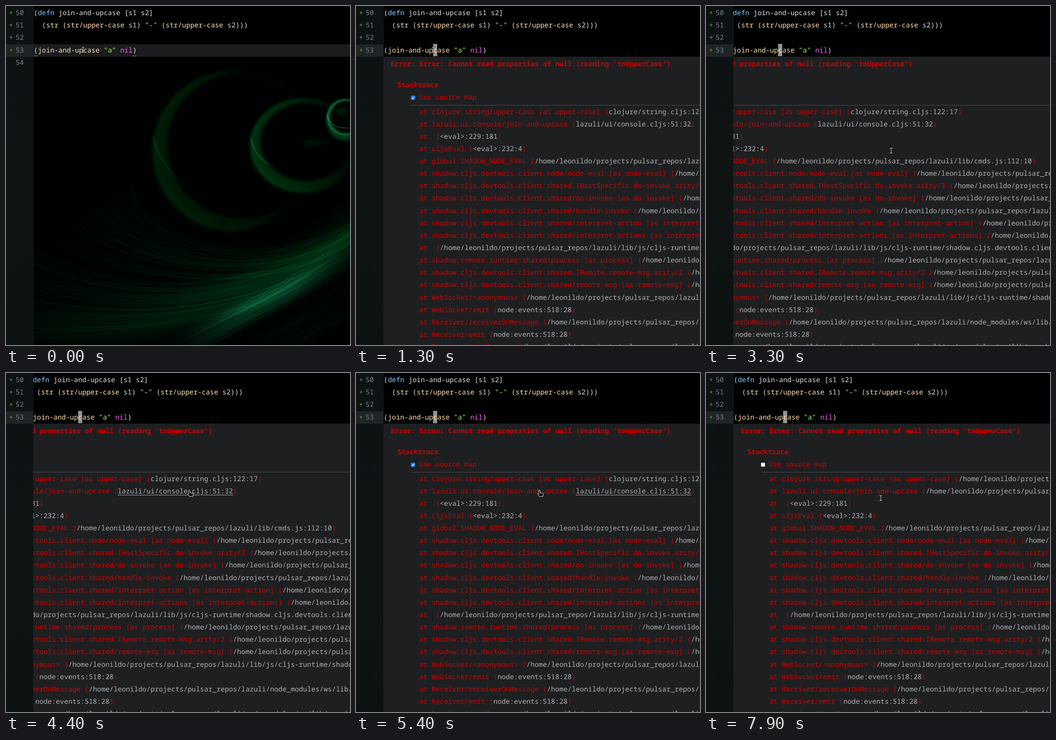
Recreate the animation shown at these times as an HTML page with a canvas. Size 754 by 743 pixels, loop 8 s.

```html
<!DOCTYPE html>
<html lang="en">
<head>
<meta charset="utf-8">
<title>Stack trace in the editor</title>
<style>
html, body { margin: 0; width: 100%; height: 100%; overflow: hidden; background: #000; }
#stage {
  position: relative; width: 754px; height: 743px; overflow: hidden; background: #000;
  font: 500 15.05px/27.14px "Noto Sans Mono", "DejaVu Sans Mono", monospace;
  font-variant-ligatures: none; text-rendering: geometricPrecision; white-space: pre;
}
#stage * { animation-duration: 8s; animation-timing-function: step-end; animation-iteration-count: infinite; }
#stage div, #art, svg { position: absolute; }

#gutter { inset: 0 auto 0 0; width: 60.5px; background: linear-gradient(#0c1113, #0f1314 45%, #0d1312 85%, #0c1211); color: #798084; }
#gutter div { left: 0; width: 60px; height: 27.14px; padding-left: 21px; box-sizing: border-box; }
#gutter .add::before { content: "+"; position: absolute; left: 6.5px; color: #64a336; }
#gutter .now { background: #1f2426; }
.last { top: 110.7px; animation-name: last; }
@keyframes last { 0% { top: 110.7px } 15% { top: 134.5px } 16.25%, 100% { top: 760px } }

#view { left: 60px; top: 0; right: 0; bottom: 0; overflow: hidden; }
#line { left: 0; right: 0; top: 83.5px; height: 27px; background: #1b1c1e; }
#pair i { position: absolute; top: 108.5px; width: 9px; height: 1px; background: #8a8f92; }
#line, #pair { animation-name: first; }
@keyframes first { 0% { opacity: 1 } 1.25%, 100% { opacity: 0 } }
#code { left: .8px; top: 2.1px; color: #dcdfdf; animation-name: code; }
@keyframes code { 0% { transform: none } 41.25% { transform: translateX(-11px) } 65%, 100% { transform: none } }
#caret { left: 108.3px; top: 81.4px; width: 9px; height: 27px; background: #929292; animation-name: caret; }
@keyframes caret { 0% { opacity: 0 } 1.25%, 100% { opacity: 1 } }
#text { left: 0; top: 0; }
.k { color: #82c8ff } .f { color: #ffdcae } .s { color: #a5f24e } .n { color: #f562ee }

#panel { left: 0; top: 110.7px; width: 694px; overflow: hidden; background: #1e1f21; animation-name: panel; }
@keyframes panel { 0% { height: 0 } 15% { height: 24px } 16.25%, 100% { height: 640px } }
#gear { left: 353px; top: 5px; animation-name: gear; }
@keyframes gear { 0% { opacity: 0 } 15% { opacity: 1 } 16.25%, 100% { opacity: 0 } }
#trace { left: -60px; top: -110.7px; width: 2200px; height: 760px; color: #d00000; animation-name: trace; }
@keyframes trace {
  0% { opacity: 0; transform: none } 16.25% { opacity: 1; transform: none }
  41.25% { opacity: 1; transform: translateX(-237px) } 65% { opacity: 1; transform: translateX(-226px) }
  66.25% { opacity: 1; transform: translateX(-96px) } 67.5%, 100% { opacity: 1; transform: none }
}
#trace b { position: absolute; }
#rule { left: 121px; top: 216.5px; width: 2000px; height: 1px; background: #484a4c; }
#stack { left: 138.7px; top: 218.5px; }
.path { color: #b0b0b0; text-decoration: underline transparent 1px; text-underline-offset: 3px; }
.l0 { animation-name: l0; }
@keyframes l0 { 0% { text-decoration-color: transparent } 52.5% { text-decoration-color: #b0b0b0 } 55%, 100% { text-decoration-color: transparent } }
.l1 { animation-name: l1; }
@keyframes l1 {
  0% { text-decoration-color: transparent } 51.25% { text-decoration-color: #b0b0b0 }
  52.5% { text-decoration-color: transparent } 55% { text-decoration-color: #b0b0b0 }
  72.5%, 100% { text-decoration-color: transparent }
}
.raw { position: absolute; animation-name: raw; }
@keyframes raw { 0% { opacity: 0 } 93.75%, 100% { opacity: 1 } }
.mapped, #tick { animation-name: mapped; }
@keyframes mapped { 0% { opacity: 1 } 93.75%, 100% { opacity: 0 } }
#box { left: 120px; top: 196px; animation-name: box; }
@keyframes box { 0% { color: #0c7bff } 87.5% { color: #0a66d6 } 97.5%, 100% { color: #0c7bff } }

#mouse { left: 0; top: 0; animation-name: mouse; }
#mouse svg { left: -20px; top: -20px; }
@keyframes mouse {
  0% { transform: translate(169px, 96px) }
  25% { transform: translate(225px, 150px) }
  26.25% { transform: translate(345px, 274px) }
  27.5% { transform: translate(395px, 317px) }
  41.25% { transform: translate(406px, 317px) }
  45% { transform: translate(406px, 305px) }
  46.25% { transform: translate(405px, 290px) }
  47.5% { transform: translate(405px, 281px) }
  51.25% { transform: translate(404px, 257px) }
  52.5% { transform: translate(404px, 223px) }
  53.75% { transform: translate(403px, 232px) }
  55% { transform: translate(402px, 257px) }
  72.5% { transform: translate(401px, 259px) }
  76.25% { transform: translate(365px, 232px) }
  77.5% { transform: translate(266px, 165px) }
  78.75% { transform: translate(189px, 130px) }
  80% { transform: translate(162px, 104px) }
  81.25% { transform: translate(152px, 97px) }
  82.5% { transform: translate(147px, 112px) }
  83.75% { transform: translate(143px, 150px) }
  85% { transform: translate(139px, 190px) }
  86.25% { transform: translate(136px, 206px) }
  87.5% { transform: translate(121px, 200px) }
  90% { transform: translate(121px, 199px) }
  97.5% { transform: translate(270px, 245px) }
  98.75%, 100% { transform: translate(383px, 274px) }
}
#beam { animation-name: beam; }
@keyframes beam { 0% { opacity: 1 } 51.25% { opacity: 0 } 72.5% { opacity: 1 } 85% { opacity: 0 } 97.5%, 100% { opacity: 1 } }
#hand { animation-name: hand; }
@keyframes hand { 0% { opacity: 0 } 51.25% { opacity: 1 } 72.5%, 100% { opacity: 0 } }
#arrow { animation-name: arrow; }
@keyframes arrow { 0% { opacity: 0 } 85% { opacity: 1 } 97.5%, 100% { opacity: 0 } }
</style>
</head>
<body>
<div id="stage"><canvas id="art" width="754" height="743"></canvas><div id="gutter"><div class="add" style="top:2.1px">50</div><div class="add" style="top:29.2px">51</div><div class="add" style="top:56.4px">52</div><div class="add now" style="top:83.5px">53</div><div class="last">54</div></div><div id="view"><div id="line"></div><div id="pair"><i style="left:.5px"></i><i style="left:217px"></i></div><div id="code"><div id="caret"></div><div id="text">(<span class="k">defn</span> join-and-upcase [s1 s2]
  (<span class="f">str</span> (<span class="f">str/upper-case</span> s1) <span class="s">"-"</span> (<span class="f">str/upper-case</span> s2)))

(<span class="f">join-and-upcase</span> <span class="s">"a"</span> <span class="n">nil</span>)</div></div><div id="panel"><svg id="gear" width="14" height="14" fill="none" stroke="#a2a2a2"><circle cx="7" cy="7" r="4" stroke-width="2"/><circle cx="7" cy="7" r="5.6" stroke-width="1.8" stroke-dasharray="2.2 2.2"/></svg><div id="trace"><b style="left:75.8px;top:114.4px">Error: Error: Cannot read properties of null (reading 'toUpperCase')</b><b style="left:90.8px;top:159.5px">Stacktrace</b><svg id="box" width="10" height="10"><rect x=".8" y=".8" width="8.4" height="8.4" rx="1" fill="#fff"/><g id="tick"><rect x=".5" y=".5" width="9" height="9" rx="1.5" fill="currentColor"/><path d="M2.4 5.2l1.9 1.9 3.4-4.2" fill="none" stroke="#fff" stroke-width="1.4"/></g></svg><div style="left:138px;top:186.5px">Use source map</div><div id="rule"></div><div id="stack"></div></div></div></div><div id="mouse"><svg id="beam" width="40" height="40" fill="none"><g transform="translate(20 20)"><path d="M-3-5.5H-1Q0-5.5 0-4.5V4.5Q0 5.5-1 5.5H-3M3-5.5H1Q0-5.5 0-4.5V4.5Q0 5.5 1 5.5H3" stroke="#111" stroke-width="2.6"/><path d="M-3-5.5H-1Q0-5.5 0-4.5V4.5Q0 5.5-1 5.5H-3M3-5.5H1Q0-5.5 0-4.5V4.5Q0 5.5 1 5.5H3" stroke="#ddd" stroke-width="1.1"/></g></svg><svg id="hand" width="40" height="40"><path transform="translate(20 20)" d="M-1.6.8a1.5 1.5 0 0 1 3 0V5.4L7 6.6Q8.8 7 8.5 9L7.6 13.6H0L-3.6 8.6Q-3.6 7-1.6 7.8Z" fill="#111" stroke="#eee"/></svg><svg id="arrow" width="40" height="40"><path transform="translate(20 20)" d="M0 0V12.5L3 9.8 5 14 7 13 5.2 9H9Z" fill="#111" stroke="#eee"/></svg></div></div>
<script>
const home = '/home/leonildo/projects/pulsar_repos/';
const lib = home + 'lazuli/lib/';
const rt = lib + 'js/cljs-runtime/';
const dev = 'shadow.cljs.devtools.client.';
const shared = dev + 'shared';
const sharedJs = rt + shared + '.js:';
const calls = [
  ['clojure.string/upper-case [as upper-case]', 'clojure/string.cljs:122:17', rt + 'clojure.string.js:204:10'],
  ['lazuli.ui.console/join-and-upcase', 'lazuli/ui/console.cljs:51:32', rt + 'lazuli.ui.console.js:96:22'],
  ['', '<eval>:229:181'],
  ['cljsEval', '<eval>:232:4'],
  ['global.SHADOW_NODE_EVAL', lib + 'cmds.js:112:10'],
  [dev + 'node/node-eval [as node-eval]', rt + dev + 'node.js:21:8'],
  [shared + '.IHostSpecific.do-invoke.arity/3', rt + dev + 'node.js:118:12'],
  [shared + '/do-invoke [as do-invoke]', sharedJs + '310:9'],
  [shared + '/handle-invoke', sharedJs + '402:17'],
  [shared + '/interpret-action [as interpret-action]', sharedJs + '655:14'],
  [shared + '/interpret-actions [as interpret-actions]', sharedJs + '690:20'],
  ['', sharedJs + '734:11'],
  ['shadow.remote.runtime.shared/process [as process]', rt + 'shadow.remote.runtime.shared.js:512:9'],
  [shared + '.IRemote.remote-msg.arity/2', sharedJs + '880:15'],
  [shared + '/remote-msg [as remote-msg]', sharedJs + '921:18'],
  ['WebSocket/<anonymous>', rt + dev + 'node.js:164:13'],
  ['WebSocket/emit', 'node:events:518:28'],
  ['Receiver/receiverOnMessage', home + 'lazuli/node_modules/ws/lib/websocket.js:1220:20'],
  ['Receiver/emit', 'node:events:518:28'],
  ['Receiver/dataMessage', home + 'lazuli/node_modules/ws/lib/receiver.js:569:14']
];
const esc = s => s.replace(/</g, '&lt;');
const link = (s, cls = '') => `<span class="path ${cls}">${esc(s)}</span>`;
document.getElementById('stack').innerHTML = calls.map(([name, path, raw], i) => {
  const head = `at ${esc(name)} (`;
  return raw
    ? `${head}<span class="raw">${link(raw)})</span><span class="mapped">${link(path, 'l' + i)})</span>`
    : `${head}${link(path)})`;
}).join('\n');

// Backdrop: dim rings above a fan of fine strands
const c = document.getElementById('art').getContext('2d');
let seed = 11;
const rnd = () => (seed = (seed * 16807) % 2147483647) / 2147483647;
const span = (a, b) => a + (b - a) * rnd();

function fade(x0, x1, rgb, ...alphas) {
  const g = c.createLinearGradient(x0, 0, x1, 0);
  alphas.forEach((a, i) => g.addColorStop(i / (alphas.length - 1), `rgba(${rgb},${a})`));
  return g;
}
function soften(blur) {
  c.filter = blur ? `blur(${blur}px)` : 'none';
}
function crescent(outer, inner, paint, blur) {
  soften(blur);
  c.fillStyle = paint;
  c.beginPath();
  c.ellipse(...outer, 0, 0, 7);
  c.closePath();
  c.moveTo(inner[0] + inner[2], inner[1]);
  c.ellipse(...inner, 0, 0, 7);
  c.fill('evenodd');
}
function blob(x, y, rx, ry, paint) {
  soften(4);
  c.fillStyle = paint;
  c.beginPath();
  c.ellipse(x, y, rx, ry, 0, 0, 7);
  c.fill();
}
function curve(pts, paint, width) {
  c.strokeStyle = paint;
  c.lineWidth = width;
  c.beginPath();
  c.moveTo(pts[0], pts[1]);
  c.bezierCurveTo(...pts.slice(2));
  c.stroke();
}
function glow(blur, ...args) {
  soften(blur);
  curve(...args);
}

c.fillStyle = '#000201';
c.fillRect(0, 0, 754, 743);
c.globalCompositeOperation = 'lighter';

crescent([496, 318, 174, 175], [516, 306, 163, 160], fade(320, 630, '0,25,5', .9, .85, .6, 0), 3);
crescent([496, 318, 174, 175], [502, 315, 170, 170], fade(320, 600, '0,12,4', .8, .4, 0), 4);
glow(1.2, [322, 285, 330, 325, 355, 365, 392, 390], fade(320, 392, '6,48,22', .7, .6, 0), 2.5);

crescent([651, 306, 116, 103], [658, 298, 100, 86], fade(535, 760, '0,42,10', .9, .85, .6, .1), 3);
crescent([651, 306, 116, 103], [655, 304, 112, 98], fade(535, 760, '0,20,9', .9, .4, 0), 3);
glow(.9, [536, 288, 543, 320, 562, 344, 594, 355], fade(535, 594, '16,76,46', .8, .7, 0), 2);

crescent([743, 249, 42, 46], [747, 243, 36, 35], 'rgba(0,55,22,.9)', 2.5);
crescent([743, 244, 40, 40], [745, 244, 36, 36], 'rgba(20,62,46,.7)', 1.2);
glow(.7, [703, 235, 705, 258, 725, 270, 754, 267], 'rgba(60,100,88,.6)', 1.5);
blob(737, 230, 12, 9, 'rgba(0,28,8,.7)');
blob(684, 299, 32, 7, fade(652, 720, '0,30,8', .9, .3, 0));

// Soft body under the strands
glow(20, [60, 700, 330, 715, 600, 640, 790, 470], fade(60, 754, '0,26,9', .3, .6, .9, .6), 70);
glow(12, [400, 745, 500, 670, 650, 620, 790, 490], fade(400, 754, '2,38,21', .2, .9, .8, .2), 36);
glow(6, [460, 690, 560, 650, 640, 615, 735, 545], fade(460, 735, '10,26,22', 0, .8, .7, 0), 14);

soften(0);
c.globalAlpha = .3;
for (let i = 0; i < 90; i++) {
  const u = rnd();
  curve([span(60, 120) + 190 * (1 - u), 390 + 130 * u, 240 + 90 * (1 - u), 530 + 70 * u, 570, 590 + 65 * u, 770, 462 + 50 * u],
    fade(60, 754, '0,62,18', 0, span(.1, .3), span(.1, .4), span(.1, .35)), span(.8, 2.8));
}
for (let i = 0; i < 120; i++) {
  const u = rnd();
  curve([55, 520 + 220 * u, 260, 640 + 80 * u, 540, 640 + 70 * u, 770, 470 + 90 * u],
    fade(60, 754, '2,66,30', span(0, .2), span(.05, .35), span(.1, .4), span(0, .2)), span(.8, 2.8));
}
for (let i = 0; i < 80; i++) {
  const u = rnd();
  curve([320 + 130 * u, 750, 470 + 50 * u, 665 + 25 * u, 640, 615 + 45 * u, 775, 470 + 90 * u],
    fade(340, 754, '16,74,52', 0, span(.1, .4), span(.1, .5), span(0, .15)), span(.6, 2));
}
for (let i = 0; i < 30; i++) {
  const u = rnd();
  curve([470 + 200 * u, 750, 560 + 130 * u, 710, 680, 660 + 60 * u, 780, 560 + 130 * u],
    fade(470, 754, '0,40,14', 0, span(.1, .4), span(0, .3)), span(1, 5));
}
</script>
</body>
</html>
```
